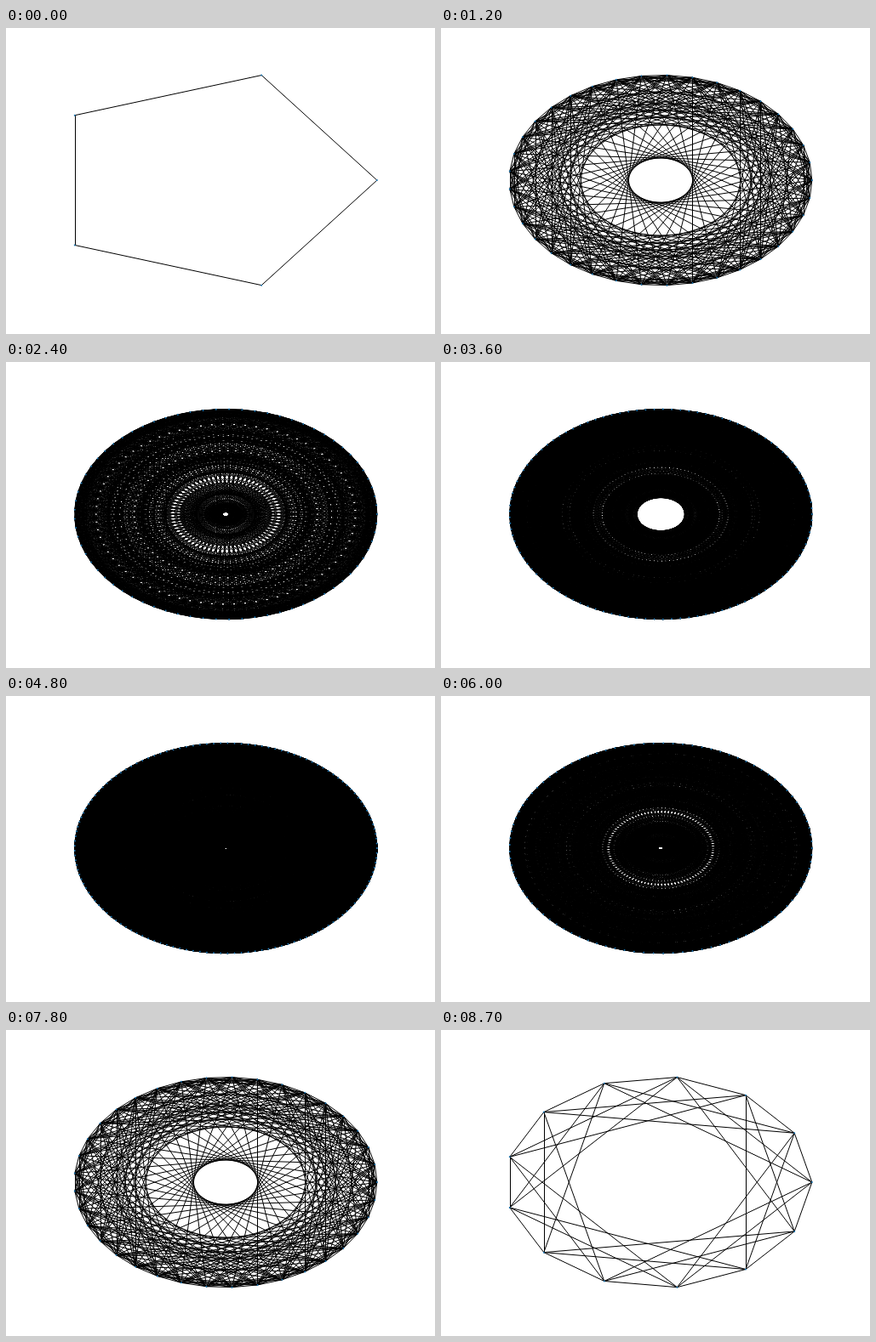
An HTML page with a canvas that plays this animation: 504x360 px, repeating every 9 s.

```html
<!DOCTYPE html>
<html lang="en">
<head>
<meta charset="utf-8">
<title>Paley graphs</title>
<style>
  html, body { margin: 0; width: 100%; height: 100%; overflow: hidden; background: #fff; }
  canvas { display: block; }
</style>
</head>
<body>
<canvas id="stage" width="504" height="360"></canvas>
<script>
const ctx = document.getElementById('stage').getContext('2d');
const STEP = 300;
const BOX = { left: 80.755, right: 435.845, top: 55.555, bottom: 302.645 };

// Primes of the form 4k + 1, the orders of the graphs
function graphOrders(count) {
  const list = [];
  for (let n = 5; list.length < count; n += 4) {
    let prime = true;
    for (let d = 3; d * d <= n; d += 2) if (n % d === 0) prime = false;
    if (prime) list.push(n);
  }
  return list;
}

const orders = graphOrders(16);
const last = orders.length - 1;

// Points on a circle, stretched so their extent fills the box
function vertices(n) {
  const circle = Array.from({ length: n }, (_, i) => {
    const a = 2 * Math.PI * i / n;
    return [Math.cos(a), Math.sin(a)];
  });
  const minX = Math.min(...circle.map(p => p[0]));
  const maxY = Math.max(...circle.map(p => p[1]));
  const midY = (BOX.top + BOX.bottom) / 2;
  const radiusY = (BOX.bottom - BOX.top) / 2;
  return circle.map(([x, y]) => [
    BOX.left + (x - minX) / (1 - minX) * (BOX.right - BOX.left),
    midY - y / maxY * radiusY
  ]);
}

function drawEdge([x1, y1], [x2, y2]) {
  // Vertical edges sit on whole pixels
  if (Math.abs(x1 - x2) < 1e-6) x1 = x2 = Math.floor(x1 + 0.5) + 0.5;
  ctx.beginPath();
  ctx.moveTo(x1, y1);
  ctx.lineTo(x2, y2);
  ctx.stroke();
}

function drawGraph(n) {
  const points = vertices(n);
  const squares = new Set();
  for (let k = 1; k < n; k++) squares.add(k * k % n);

  ctx.fillStyle = '#fff';
  ctx.fillRect(0, 0, 504, 360);

  ctx.strokeStyle = '#000';
  ctx.lineWidth = 1;
  for (let i = 0; i < n; i++) {
    for (let j = i + 1; j < n; j++) {
      if (squares.has(j - i)) drawEdge(points[i], points[j]);
    }
  }

  ctx.fillStyle = '#1f78b4';
  for (const [x, y] of points) {
    ctx.beginPath();
    ctx.arc(x, y, 1, 0, 2 * Math.PI);
    ctx.fill();
  }
}

let shown = -1;
const start = performance.now();

function tick() {
  const step = Math.floor((performance.now() - start) / STEP) % (2 * last);
  const index = last - Math.abs(last - step);
  if (index !== shown) {
    shown = index;
    drawGraph(orders[index]);
  }
  requestAnimationFrame(tick);
}
tick();
</script>
</body>
</html>
```
